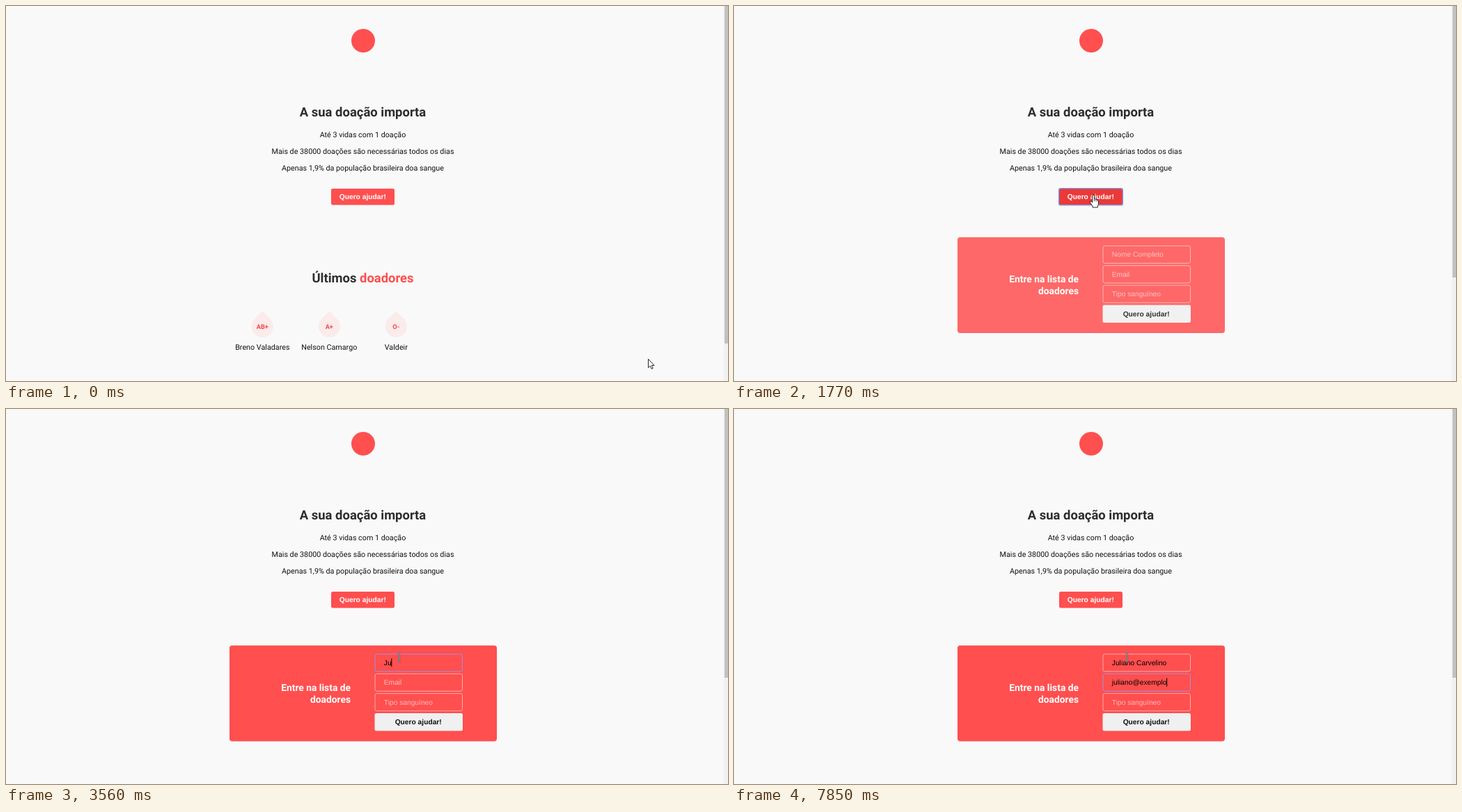
Write an HTML page that moves like this. It is 1037 px wide and 540 px high and loops after 8000 ms.

```html
<!DOCTYPE html>
<html lang="pt-BR">
<head>
<meta charset="utf-8">
<title>Doação</title>
<style>
html, body { margin: 0; width: 100%; height: 100%; overflow: hidden; background: #f9f9f9; }
svg { display: block; width: 1037px; height: 540px; }
text { font: 10.75px Roboto, sans-serif; fill: #111; text-rendering: geometricPrecision; white-space: pre; }
.mid { text-anchor: middle; }
.end { text-anchor: end; }
.title { font-size: 18.43px; font-weight: 700; fill: #2d2d2d; }
.red { fill: #ff4f4f; }
.type { font-size: 9.2px; font-weight: 700; fill: #f04a4a; }
.call { font-size: 13.82px; font-weight: 700; fill: #fff; }
.btn { font: 700 10.24px "Liberation Sans", Arial, sans-serif; }
.field { font: 10.24px "Liberation Sans", Arial, sans-serif; fill: #000; }
.hint { fill: #ffbcbc; }
.box { fill: none; stroke: #ffabab; }
.ring { fill: none; stroke: #6f9cf0; stroke-width: 1.3; }
</style>
</head>
<body>
<svg viewBox="0 0 1037 540">
  <rect width="1037" height="540" fill="#f9f9f9"/>
  <circle cx="513" cy="50" r="17" fill="#ff4f4f"/>
  <text class="mid title" x="512.5" y="159">A sua doação importa</text>
  <text class="mid" x="512.5" y="189">Até 3 vidas com 1 doação</text>
  <text class="mid" x="512.5" y="213">Mais de 38000 doações são necessárias todos os dias</text>
  <text class="mid" x="512.5" y="236.8">Apenas 1,9% da população brasileira doa sangue</text>

  <g id="donors">
    <text class="mid title" x="512.5" y="398">Últimos <tspan class="red">doadores</tspan></text>
  </g>

  <rect id="help" x="467" y="263" width="91" height="23.5" rx="2.5"/>
  <text class="mid btn" x="512.3" y="278" style="fill:#fff">Quero ajudar!</text>
  <rect id="helpRing" class="ring" x="466.6" y="262.6" width="91.8" height="24.2" rx="2"/>

  <g id="panel">
    <rect x="321" width="384" height="138" rx="4" fill="#ff4f4f"/>
    <text class="end call" x="495" y="65">Entre na lista de</text>
    <text class="end call" x="495" y="82">doadores</text>
    <g id="fields"></g>
    <rect x="529.5" y="97.5" width="126.5" height="25.5" rx="2.5" fill="#f0f0f0"/>
    <text class="mid btn" x="592.2" y="113.8">Quero ajudar!</text>
    <path id="caret" stroke="#000"/>
  </g>

  <rect x="1030.5" width="7" height="540" fill="#f1f1f1"/>
  <rect id="thumb" x="1032" width="5" fill="#c1c1c1"/>

  <g id="cursor" stroke-linejoin="round">
    <path id="arrow" fill="#fff" stroke="#111" stroke-width=".9"
      d="M0 0V12.3L2.8 9.8L4.8 14.2L6.7 13.3L4.8 9H8.6Z"/>
    <g id="hand" fill="#fff" stroke="#111" stroke-width=".9">
      <path d="M-1.7 10V1.5Q-1.7 0-.3 0Q1 0 1 1.5V6Q2.2 5.2 3.3 6.5Q4.6 6 5.2 7Q6.8 6.6 7 8.3V12.5Q6.8 14.5 5.8 15.7V18H-1.5V16.3L-5 11Q-5.8 9.5-4.6 9Q-3.4 8.8-1.7 11Z"/>
      <path d="M1 6V9.3M3.2 6.7V9.3M5.2 7.2V9.6" stroke-width=".7"/>
    </g>
    <path id="beam" fill="none" stroke="#1f9aa5" d="M-2.3-6H2.3M0-6V6M-2.3 6H2.3"/>
  </g>
</svg>
<script>
const LOOP = 8000, CLICK = 1540, FOCUS = 2460, TAB = 5610;
const $ = id => document.getElementById(id);

function add(parent, tag, attrs, text = "") {
  const el = document.createElementNS("http://www.w3.org/2000/svg", tag);
  for (const k in attrs) el.setAttribute(k, attrs[k]);
  el.textContent = text;
  return parent.appendChild(el);
}

const clamp = x => Math.max(0, Math.min(1, x));
const ramp = (t, a, b) => clamp((t - a) / (b - a));
const smooth = x => x * x * (3 - 2 * x);
const mix = (a, b, p) => a + (b - a) * p;
const show = (el, on) => el.style.display = on ? "" : "none";

// Number of screen refreshes done out of n, spread evenly from a to b
const ticks = (t, a, b, n) =>
  t < a ? 0 : Math.min(n, 1 + Math.floor((t - a) / (b - a) * (n - 1) + 1e-6));

[["AB+", "Breno Valadares"], ["A+", "Nelson Camargo"], ["O-", "Valdeir"]].forEach(([type, name], i) => {
  const x = 368.3 + 96 * i;
  add($("donors"), "path", {
    d: `M${x} 439.6l10.96 10.94a15.5 15.5 0 1 1 -21.92 0Z`, fill: "#fbebeb"
  });
  add($("donors"), "text", { class: "mid type", x, y: 464.7 }, type);
  add($("donors"), "text", { class: "mid", x, y: 495.3 }, name);
});

const fields = [
  { hint: "Nome Completo", value: "Juliano Carvelino", from: FOCUS, to: TAB,
    keys: [3330, 3560, 3730, 3880, 3960, 4040, 4110, 4190, 4420, 4570, 4650, 4720, 4900, 5220, 5300, 5380, 5380] },
  { hint: "Email", value: "juliano@exemplo", from: TAB, to: LOOP,
    keys: [5910, 5990, 6070, 6220, 6300, 6380, 6450, 6770, 7000, 7150, 7300, 7380, 7530, 7700, 7850] },
  { hint: "Tipo sanguíneo", value: "", from: LOOP, to: LOOP, keys: [] }
];
fields.forEach((f, i) => {
  f.y = 12.4 + 28.4 * i;
  f.box = add($("fields"), "rect", { class: "box", x: 530, y: f.y, width: 125.5, height: 25, rx: 2.5 });
  f.label = add($("fields"), "text", { x: 542.8, y: f.y + 16.1 });
});

function drawFields(t) {
  const blink = t >= 3030 && t < 3330;
  let caret = "";
  for (const f of fields) {
    const active = t >= f.from && t < f.to;
    const typed = f.value.slice(0, f.keys.filter(k => k <= t).length);
    f.label.textContent = typed || f.hint;
    f.label.setAttribute("class", typed ? "field" : "field hint");
    f.box.style.stroke = active ? "#a58fd8" : "";
    if (active && !blink) {
      const x = typed ? 543 + f.label.getComputedTextLength() : 543.5;
      caret = `M${x} ${f.y + 6.3}v12`;
    }
  }
  $("caret").setAttribute("d", caret);
}

function pointer(t) {
  const a = smooth(ticks(t, 70, 840, 11) / 11);
  const b = ticks(t, 910, 1140, 4) / 4;
  const c = smooth(clamp((ticks(t, CLICK, 2310, 11) - 4) / 7));
  const x = mix(mix(mix(922.5, 528.5, a), 516.5, b), 564.5, c);
  const y = mix(mix(mix(508.5, 280, a), 272, b), 358, c);
  return [x, y];
}

function draw(t) {
  const open = t >= CLICK;
  const n = ticks(t, CLICK, 2310, 11);
  const p = 1 - (1 - clamp((n - 1) * 77 / 340)) ** 2;
  const top = mix(267.5, 340.5, p);

  show($("panel"), open);
  $("panel").setAttribute("transform", `translate(0 ${top})`);
  $("panel").setAttribute("opacity", p ** 1.5);
  $("donors").setAttribute("transform", `translate(0 ${open ? top - 152 : 0})`);
  $("thumb").setAttribute("height", open ? 387 + (340.5 - top) * .53 : 486);

  const hover = ramp(t, 740, 840) - ramp(t, 1925, 2125);
  $("help").setAttribute("fill", `rgb(${mix(255, 235, hover)},${mix(79, 57, hover)},${mix(79, 57, hover)})`);
  show($("helpRing"), open && t < FOCUS);
  drawFields(t);

  const [x, y] = pointer(t);
  const onHelp = x > 467 && x < 558 && y > 263 && y < 287;
  const onField = open && x > 529 && x < 656 && y > top + 12 && y < top + 38;
  show($("hand"), onHelp);
  show($("beam"), onField);
  show($("arrow"), !onHelp && !onField);
  $("cursor").setAttribute("transform", `translate(${x} ${y})`);
}

const start = performance.now();
function frame() {
  draw((performance.now() - start) % LOOP);
  requestAnimationFrame(frame);
}
frame();
</script>
</body>
</html>
```
